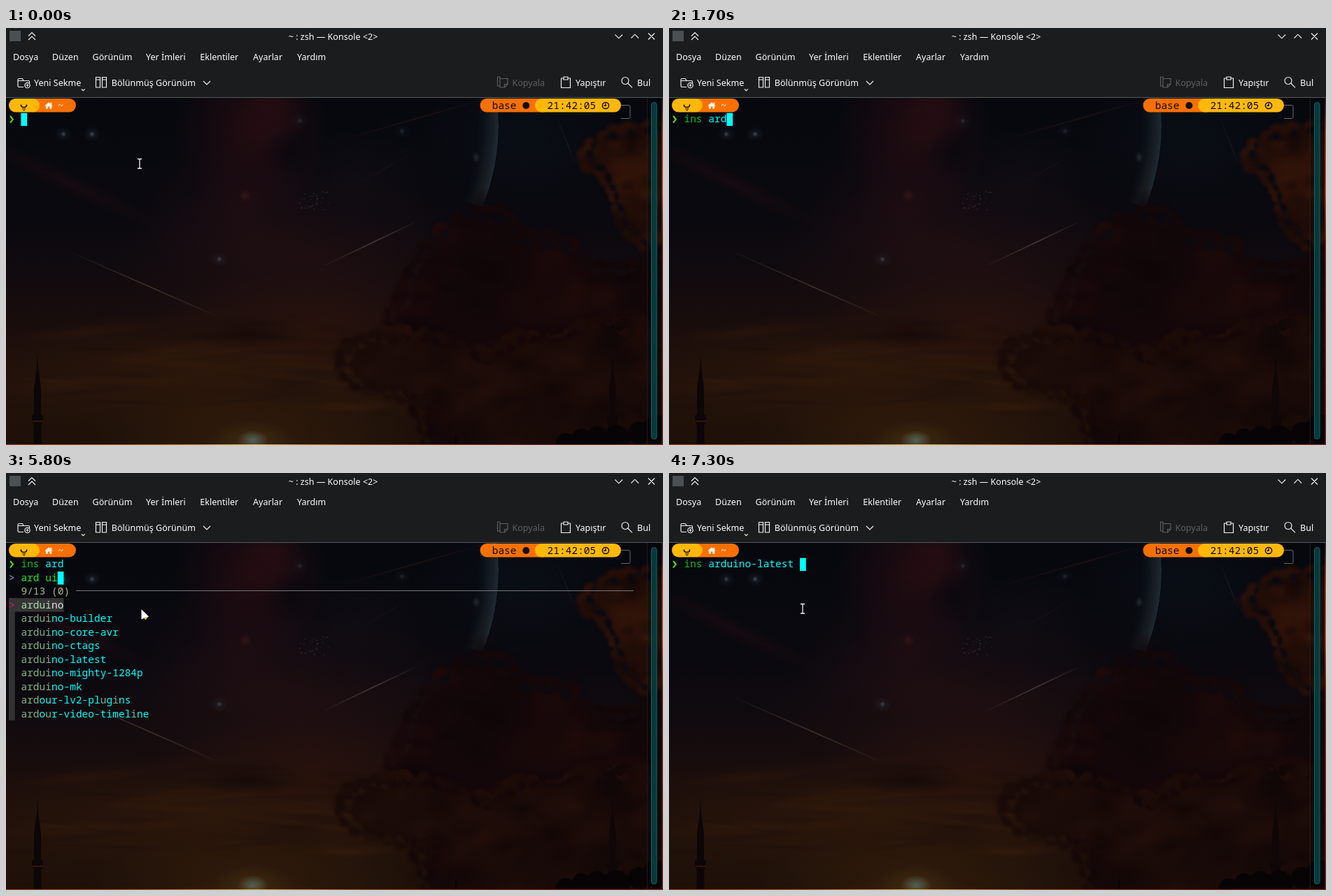
Animation of 939 by 597 pixels, one loop 8000 ms. Source, as an HTML page with a canvas:

```html
<!DOCTYPE html>
<html lang="tr">
<head>
<meta charset="utf-8">
<title>Terminal</title>
<style>
  html, body { margin: 0; width: 100%; height: 100%; overflow: hidden; background: #1b1c1d; }
  canvas, svg { position: absolute; left: 0; top: 0; width: 939px; height: 597px; }
  text { white-space: pre; }
  .ui { font: 12.55px "Noto Sans", sans-serif; fill: #fcfcfc; }
  .mono { font: 14.53px "Noto Sans Mono", monospace; font-variant-ligatures: none; }
  .icon { fill: none; stroke: #f4f4f4; stroke-width: 1.15; }
  .off { stroke: #5d6062; }
</style>
</head>
<body>
<canvas id="sky" width="939" height="597"></canvas>
<svg viewBox="0 0 939 597">
  <rect width="939" height="99" fill="#1b1c1d"/>
  <rect y="99" width="939" height="1" fill="#55585a"/>

  <!-- title bar -->
  <rect x="5" y="4" width="16" height="15" fill="#4b5052"/>
  <path class="icon" d="M32 11.5l5-5 5 5M32 17l5-5 5 5M870.5 9.5l5.3 5.3 5.3-5.3M893.5 14.5l5.3-5.3 5.3 5.3M918 7.5l9 9m0-9l-9 9"/>
  <g class="ui">
    <text x="403.8" y="16.5">~ : zsh — Konsole &lt;2&gt;</text>
    <text x="10" y="45.5">Dosya</text>
    <text x="66" y="45.5">Düzen</text>
    <text x="123.5" y="45.5">Görünüm</text>
    <text x="200" y="45.5">Yer İmleri</text>
    <text x="277.3" y="45.5">Eklentiler</text>
    <text x="353" y="45.5">Ayarlar</text>
    <text x="416" y="45.5">Yardım</text>
    <text x="40" y="82.5">Yeni Sekme</text>
    <text x="150.8" y="82.5">Bölünmüş Görünüm</text>
    <text x="723.5" y="82.5" fill="#5d6062" style="fill:#5d6062">Kopyala</text>
    <text x="814" y="82.5">Yapıştır</text>
    <text x="902" y="82.5">Bul</text>
  </g>

  <!-- toolbar icons -->
  <g class="icon">
    <path d="M25 84.5h-6.5q-1.500 0-1.500-1.500v-9q0-1.500 1.500-1.500h5l1.500 3h7q1.500 0 1.500 1.500v2M17 75.500h8"/>
    <circle cx="30.500" cy="82" r="3.700"/>
    <path d="M30.500 80v4m-2-2h4M108 87.500l2.300 2.300 2.300-2.300"/>
    <path d="M128.500 70.500h6v14.500h-6zM137.500 70.500h6v14.500h-6zM128.500 74h6M137.500 74h6M282 76l5 5 5-5"/>
    <path class="off" d="M706 72.500v-2.500h-3.500v13h3M706 72.500h11v8l-4.500 4.500h-6.500zM717 80.500h-4.500v4.500"/>
    <path d="M797 72h-3.500v13.500h13v-13.500h-3.500M797 70h6v4h-6z"/>
    <circle cx="885" cy="75.500" r="5"/>
    <path d="M888.700 79l6.300 6.300"/>
  </g>

  <!-- scroll bar -->
  <rect x="916" y="100" width="23" height="496" fill="#000" opacity=".22"/>
  <rect x="916" y="100" width="1" height="496" fill="#2c2220" opacity=".7"/>
  <rect x="922.500" y="106.500" width="7.500" height="482" rx="3.700" fill="#06393c" stroke="#116467"/>
  <linearGradient id="edge" x2="0" y2="1">
    <stop stop-color="#262a36"/>
    <stop offset=".1" stop-color="#a84a2a"/>
    <stop offset=".27" stop-color="#c0583a"/>
    <stop offset=".42" stop-color="#702a22"/>
    <stop offset="1" stop-color="#6c2820"/>
  </linearGradient>
  <rect x="937.500" y="100" width="1.500" height="497" fill="url(#edge)"/>

  <!-- prompt segments -->
  <rect x="30" y="101" width="70" height="19.500" rx="9.700" fill="#f77003"/>
  <rect x="4" y="101" width="44" height="19.500" rx="9.700" fill="#ffb80a"/>
  <path d="M21.500 109.500q-.5 4 4 4t4-4" fill="none" stroke="#15100a" stroke-width="1.600"/>
  <path d="M23.500 115h1.700v1.500h-1.700zM26.200 115h1.700v1.500h-1.700zM24.900 117h1.600v1.400h-1.600z" fill="#15100a"/>
  <path d="M55 111.500l6-5.300 2.500 2.200v-1.600h1.800v3.200l1.700 1.500h-1.700v4.200h-3v-3.200h-2.400v3.200h-3v-4.200z" fill="#ffeede"/>
  <rect x="677.500" y="101" width="100" height="19.500" rx="9.700" fill="#f77003"/>
  <rect x="756" y="101" width="123" height="19.500" rx="9.700" fill="#ffb80a"/>
  <g class="mono" fill="#0c0a08">
    <text x="73.800" y="116" fill="#ffeede">~</text>
    <text x="694.700" y="116">base</text>
    <text x="773.600" y="116">21:42:05</text>
  </g>
  <circle cx="743.300" cy="111" r="5" fill="#16100a"/>
  <g fill="none" stroke="#0c0a08" stroke-width="1.500">
    <circle cx="857" cy="111" r="4.600"/>
    <path d="M857 108v3.200h-2.400"/>
  </g>
  <path d="M879 110.500h11q2 0 2 2v15q0 2-2 2h-11" fill="none" stroke="#66676a"/>
  <path d="M6 126l3.800 4.800-3.800 4.800" fill="none" stroke="#5fd700" stroke-width="2.100"/>

  <g id="term" class="mono"></g>

  <path id="beam" fill="none" stroke="#f2f2f2" stroke-width="1.300" d="M188 187.500h2q1 0 1 1v11.500q0 1-1 1h-2M194 187.500h-2q-1 0-1 1M194 201h-2q-1 0-1-1"/>
  <g id="arrow">
    <path d="M193.500 195v14.500l3.500-1.500h3.500l3.500-2.500z" fill="#fff"/>
    <path d="M196.800 207.500l3.800-1.500.4 3.300-2 .7z" fill="#f2b632"/>
  </g>
</svg>

<script>
const $ = id => document.getElementById(id);

/* ---------- wallpaper ---------- */
const g = $('sky').getContext('2d');
let seed = 11;
const rnd = () => (seed = (seed * 16807) % 2147483647) / 2147483647;

function glow(x, y, rx, ry, rgb, a, turn = 0) {
  g.save();
  g.translate(x, y);
  g.rotate(turn);
  g.scale(rx, ry);
  const f = g.createRadialGradient(0, 0, 0, 0, 0, 1);
  f.addColorStop(0, `rgba(${rgb},${a})`);
  f.addColorStop(.5, `rgba(${rgb},${a * .5})`);
  f.addColorStop(1, `rgba(${rgb},0)`);
  g.fillStyle = f;
  g.fillRect(-1, -1, 2, 2);
  g.restore();
}

function blend(x0, y0, x1, y1, ...stops) {
  const f = g.createLinearGradient(x0, y0, x1, y1);
  stops.forEach(([at, c]) => f.addColorStop(at, c));
  return f;
}

// A bank of cloud: soft bumps along a ridge, then faint light and shade inside.
function cloud(ridge, fill, lit, size, mottles) {
  g.save();
  g.filter = 'blur(2.5px)';
  const shape = new Path2D();
  ridge.forEach(([x, y]) => shape.lineTo(x, y));
  for (let i = 0; i + 1 < ridge.length; i++) {
    const [ax, ay] = ridge[i], [bx, by] = ridge[i + 1];
    const n = Math.ceil(Math.hypot(bx - ax, by - ay) / size);
    for (let k = 0; k < n; k++) {
      const t = (k + rnd()) / n, r = size * (.3 + rnd() * .7);
      const x = ax + (bx - ax) * t, y = ay + (by - ay) * t;
      shape.moveTo(x + r, y);
      shape.arc(x, y, r, 0, 7);
    }
  }
  g.fillStyle = fill;
  g.fill(shape);
  g.filter = 'none';
  g.clip(shape);
  const xs = ridge.map(p => p[0]), ys = ridge.map(p => p[1]);
  const left = Math.min(...xs), top = Math.min(...ys);
  const w = Math.max(...xs) - left, h = Math.max(...ys) - top;
  for (let i = 0; i < mottles; i++) {
    const r = size * (.7 + rnd() * 1.6);
    glow(left + rnd() * w, top + rnd() * h, r * 1.5, r, i % 2 ? lit : '8,3,5', .35, rnd() - .5);
  }
  g.restore();
}

function streak(x0, y0, x1, y1, rgb, a, w) {
  g.strokeStyle = blend(x0, y0, x1, y1, [0, `rgba(${rgb},.05)`], [.55, `rgba(${rgb},${a})`], [1, `rgba(${rgb},.05)`]);
  g.lineWidth = w;
  g.beginPath();
  g.moveTo(x0, y0);
  g.lineTo(x1, y1);
  g.stroke();
}

function minaret(x, top, fill) {
  const side = [[0, 0], [1, 18], [5, 48], [5, 85], [8, 87], [8, 93], [5, 103], [6, 140]];
  g.fillStyle = fill;
  g.beginPath();
  side.forEach(([dx, dy]) => g.lineTo(x + dx, top + dy));
  side.reverse().forEach(([dx, dy]) => g.lineTo(x - dx, top + dy));
  g.fill();
}

function paintSky() {
  g.fillStyle = blend(0, 100, 0, 597, [0, '#06080e'], [.35, '#0a090f'], [.55, '#130b0e'], [.7, '#1c0e0b'], [.85, '#22120a'], [1, '#1e1009']);
  g.fillRect(0, 100, 939, 497);

  // nebula, haze and horizon light
  glow(350, 145, 110, 130, '60,16,20', .5);
  glow(385, 120, 50, 60, '60,18,22', .35);
  glow(408, 180, 38, 40, '8,7,12', .7);
  glow(330, 260, 140, 100, '44,15,20', .4);
  glow(430, 330, 280, 120, '48,20,20', .45);
  glow(500, 215, 120, 70, '26,18,26', .4);
  glow(740, 160, 150, 100, '12,22,30', .45);
  glow(90, 222, 150, 16, '52,16,20', .3, .45);
  glow(300, 490, 340, 90, '60,32,10', .42);
  glow(430, 420, 210, 80, '52,22,12', .45);
  glow(350, 590, 230, 70, '74,46,12', .4);

  // planet with a lit right limb
  g.save();
  g.beginPath();
  g.rect(0, 100, 939, 160);
  g.clip();
  for (let i = 0; i < 14; i++) {
    g.strokeStyle = `rgba(84,94,102,${.06 * (1 - i / 14)})`;
    g.lineWidth = 2 + i * 2.4;
    g.beginPath();
    g.arc(391 - i * 1.2, 138, 312, -.13, .38);
    g.stroke();
  }
  g.restore();
  glow(680, 250, 24, 22, '14,9,13', .8);
  glow(672, 185, 6, 8, '100,108,114', .3);

  // stars
  [[82, 152, .4], [123, 152, .45], [305, 331, .35], [420, 133, .2], [566, 148, .2]].forEach(([x, y, a]) => {
    glow(x, y, 13, 11, '60,74,88', a * .6);
    glow(x, y, 4, 4, '120,138,150', a);
  });
  glow(342, 240, 9, 9, '90,32,36', .4);
  for (let i = 0; i < 45; i++) {
    g.fillStyle = `rgba(120,130,142,${rnd() * .35})`;
    g.fillRect(438 + (rnd() + rnd() - 1) * 24, 245 + (rnd() + rnd() - 1) * 18, 1.5, 1.5);
  }
  for (let i = 0; i < 90; i++) {
    g.fillStyle = `rgba(120,130,140,${rnd() * .14})`;
    g.fillRect(rnd() * 800, 102 + rnd() * 230, 1, 1);
  }
  streak(480, 160, 680, 103, '90,28,26', .35, 1.4);
  streak(500, 225, 575, 182, '70,46,50', .25, 1);
  streak(788, 130, 814, 195, '64,66,70', .4, 1);
  streak(455, 340, 585, 278, '110,92,90', .55, 1.5);
  streak(95, 322, 300, 412, '110,86,70', .5, 1.4);

  // low haze bands
  for (let i = 0; i < 34; i++) {
    const y = 415 + rnd() * 130;
    glow(rnd() * 520, y, 50 + rnd() * 100, 4 + rnd() * 8, i % 3 ? '18,9,8' : '72,36,12', .22, rnd() * .3 - .15);
  }
  glow(345, 438, 90, 22, '18,8,8', .7);

  // clouds
  cloud([[939, 140], [905, 142], [862, 150], [832, 168], [825, 195], [850, 205], [868, 238], [882, 285], [910, 310], [939, 325]], '#260e08', '66,27,10', 13, 40);
  cloud([[939, 597], [939, 318], [885, 345], [835, 340], [800, 305], [740, 300], [722, 272], [694, 262], [645, 272], [612, 300], [580, 345], [565, 390], [545, 412], [570, 470], [600, 597]], '#140709', '36,12,9', 15, 80);
  cloud([[939, 597], [939, 420], [890, 430], [840, 415], [790, 445], [735, 440], [690, 470], [640, 450], [585, 435], [530, 440], [490, 455], [475, 485], [510, 520], [600, 535], [650, 597]], '#190a08', '44,18,9', 14, 90);
  glow(680, 345, 95, 60, '14,5,7', .6);
  glow(560, 480, 70, 40, '40,18,9', .35);
  glow(790, 400, 110, 38, '38,14,9', .35);
  glow(760, 570, 220, 50, '22,10,8', .6);

  // sun
  glow(352, 592, 60, 30, '84,62,26', .45);
  glow(353, 590, 22, 14, '92,112,104', .75);

  // skyline
  minaret(45, 468, '#0c0608');
  g.fillStyle = '#341609';
  g.fillRect(38, 562, 15, 2);
  minaret(867, 470, '#0e0607');
  g.fillStyle = '#080406';
  g.beginPath();
  [[800, 594, 14], [822, 586, 13], [845, 586, 16], [872, 589, 20], [905, 580, 16], [930, 574, 20]]
    .forEach(([x, y, r]) => { g.moveTo(x + r, y); g.arc(x, y, r, 0, 7); });
  g.fill();
  g.fillRect(642, 582, 2, 15);

  g.fillStyle = blend(0, 0, 939, 0, [0, '#a0421c'], [.2, '#b3601c'], [.38, '#e0b04a'], [.55, '#b3521c'], [.8, '#7c2c1c'], [1, '#8c3a22']);
  g.fillRect(0, 596, 939, 1);
}

/* ---------- terminal ---------- */
const CELL = 8.718, ROW = 19.46;
const CYAN = '#00ffff', GREEN = '#14bd14', DIM = '#0c6062';
const HISTORY = 'ins onlyoffice-desktopeditors';
const PACKAGES = ['arden', 'ardentryst', 'ardour', 'ardour-data', 'ardour-lv2-plugins', 'ardour-video-timeline',
  ...['', '-builder', '-core-avr', '-ctags', '-latest', '-mighty-1284p', '-mk'].map(s => 'arduino' + s)];

const term = $('term');
const colX = c => 4 + c * CELL;
const rowY = r => 101.3 + r * ROW;

function add(parent, tag, attrs, str) {
  const e = document.createElementNS('http://www.w3.org/2000/svg', tag);
  for (const k in attrs) e.setAttribute(k, attrs[k]);
  if (str) e.textContent = str;
  parent.append(e);
  return e;
}
const box = (c, r, cols, fill, rows = 1, inset = 0) =>
  add(term, 'rect', { x: colX(c), y: rowY(r) + inset, width: cols * CELL, height: rows * ROW - inset, fill });
const cursor = (c, r, fill = CYAN) => box(c, r, 1, fill, 1, .9);

// Each run is [text, colour].
function write(c, r, ...runs) {
  const line = add(term, 'text', { x: colX(c), y: rowY(r) + 14.7 });
  runs.forEach(([s, fill]) => s && add(line, 'tspan', { fill }, s));
}

function shell(cmd, arg = '', hint = false) {
  const end = 2 + cmd.length + arg.length;
  cursor(end, 1, hint ? DIM : CYAN);
  write(2, 1, [cmd, cmd.startsWith('ins') ? GREEN : '#e0342f'], [arg, CYAN]);
  if (hint) {
    const rest = HISTORY.slice(cmd.length);
    write(end, 1, [rest[0], '#07090c'], [rest.slice(1), DIM]);
  }
}

// Positions of the second search term, or null when it does not match.
function match(name, word) {
  const at = name.indexOf(word, 3);
  if (at >= 0) return [...word].map((_, i) => at + i);
  const hits = [];
  let pos = name.length;
  for (const ch of [...word].reverse()) {
    pos = name.lastIndexOf(ch, pos - 1);
    if (pos < 3) return null;
    hits.unshift(pos);
  }
  return hits;
}

function finder(query, picked = 0) {
  const span = h => h.length ? h[h.length - 1] - h[0] : 0;
  const found = PACKAGES.map(name => ({ name, hits: match(name, query) }))
    .filter(p => p.hits)
    .sort((a, b) => span(a.hits) - span(b.hits));
  const info = `${found.length}/${PACKAGES.length} (0)`;

  write(2, 1, ['ins ', GREEN], ['ard', CYAN]);
  write(0, 2, ['> ', '#87afd7'], ['ard ' + query, '#1fe81f']);
  cursor(6 + query.length, 2);
  write(2, 3, [info, '#afaf87']);
  const x = colX(3 + info.length);
  add(term, 'rect', { x, y: 168, width: 897 - x, height: 1, fill: '#77777a' });

  box(0, 4, 1, '#333333', found.length);
  found.forEach(({ name, hits }, i) => {
    const on = i === picked;
    if (on) {
      box(0, 4 + i, 2 + name.length, '#353535');
      write(0, 4 + i, ['>', '#e0165a']);
    }
    write(2, 4 + i, ...[...name].map((ch, k) =>
      [ch, k < 3 || hits.includes(k) ? (on ? '#afd7af' : '#87af87') : (on ? '#e4e4e4' : CYAN)]));
  });
}

// [start in ms, pointer shown, draw]
const STEPS = [
  [0, 'beam', () => shell('')],
  [300, '', () => shell('i', '', true)],
  [400, '', () => shell('in', '', true)],
  [700, '', () => shell('ins', '', true)],
  [900, '', () => shell('ins ', '', true)],
  [1500, '', () => shell('ins ', 'a')],
  [1700, '', () => shell('ins ', 'ard')],
  [2800, 'arrow', () => finder('')],
  [5500, 'arrow', () => finder('u')],
  [5800, 'arrow', () => finder('ui')],
  [6000, 'arrow', () => finder('uil')],
  [6800, 'arrow', () => finder('uil', 1)],
  [7300, 'beam', () => shell('ins ', 'arduino-latest ')]
];
const LOOP = 8000, start = performance.now();
let shown;

function tick() {
  const t = (performance.now() - start) % LOOP;
  const step = STEPS.findLast(s => s[0] <= t);
  if (step !== shown) {
    shown = step;
    term.replaceChildren();
    step[2]();
    for (const id of ['beam', 'arrow']) $(id).style.display = step[1] === id ? '' : 'none';
  }
  requestAnimationFrame(tick);
}

paintSky();
tick();
</script>
</body>
</html>
```
